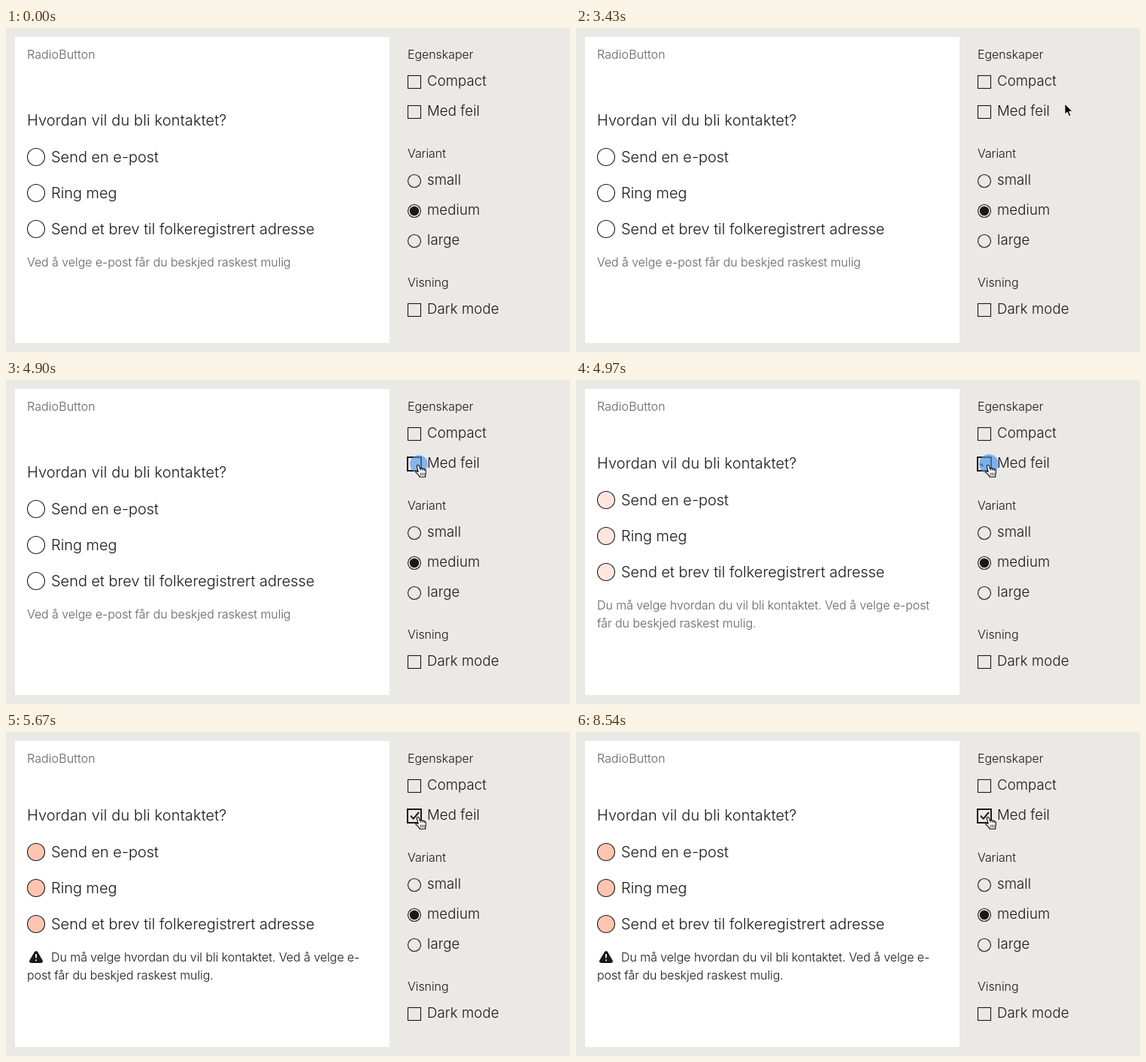
Animation, 750 px wide and 432 px high, one loop 9240 ms. Source, as an HTML page:

```html
<!DOCTYPE html>
<html lang="nb">
<head>
<meta charset="utf-8">
<title>RadioButton</title>
<style>
  html, body { margin: 0; width: 100%; height: 100%; overflow: hidden; background: #ebe9e5; }
  svg { display: block; width: 100vw; height: 100vh; }
  text {
    font-family: Inter, "Open Sans", sans-serif;
    font-weight: 300;
    font-optical-sizing: none;
    letter-spacing: -.004em;
    fill: #1b1917;
  }
  .s { font-size: 16px; }
  .m { font-size: 18.7px; letter-spacing: .002em; }
  .l { font-size: 20px; letter-spacing: -.002em; }
  .title { letter-spacing: .006em; }
  .muted { fill: #636160; }
  .line { fill: none; stroke: #1b1917; stroke-width: 1.1; }
</style>
</head>
<body>
<svg id="stage" viewBox="0 0 750 432">
  <rect width="750" height="432" fill="#ebe9e5"/>
  <rect x="12" y="12" width="498" height="408" fill="#fff"/>
  <text class="s title muted" x="28" y="41">RadioButton</text>
  <g id="form">
    <text class="l title" x="28" y="130">Hvordan vil du bli kontaktet?</text>
    <g id="options"></g>
    <text id="help1" class="s" y="318"></text>
    <text id="help2" class="s" x="28" y="342"></text>
    <g id="warning">
      <path d="M40 306.6L33.6 317.4H46.4Z" fill="#1b1917" stroke="#1b1917" stroke-width="5" stroke-linejoin="round"/>
      <path d="M40 308V313.2M40 315.5V317.3" stroke="#fff" stroke-width="1.8"/>
    </g>
  </g>
  <g id="panel"></g>
  <path id="tick" d="M538 111.8L541.8 115.6L549 107" fill="none" stroke="#1b1917" stroke-width="2" pathLength="1" stroke-dasharray="1 2"/>
  <circle id="press" cx="549" cy="112" fill="#4b94ee"/>
  <g id="cursor" stroke-linejoin="round">
    <path id="arrow" d="M0 0V14.2L3.3 11.2L5.6 16.7L8 15.7L5.7 10.4H10.2Z" fill="#000" stroke="#fff" stroke-width="1"/>
    <g id="hand" stroke="#000" stroke-linecap="round">
      <path d="M-1.2 7.6L-2.6 2.6C-3.1 .6-.4-.4 .3 1.6L1.6 5.4C2.2 4.2 4 4.4 4.3 5.6C5 4.6 6.7 5 6.9 6.2C7.8 5.6 9 6.2 9.2 7.6C9.6 9.6 9.2 11.6 8.8 13L8.6 16.2H1.2C.4 14-2 12.2-3.6 10.6C-5 9-3.4 7.8-1.8 9L-1 9.6Z" fill="#fff" stroke-width="1.1"/>
      <path d="M1.6 5.4L2.1 7.4M4.3 5.6L4.7 7.6M6.9 6.2L7.2 8M2.4 11V14M4.6 11V14M6.8 11V14" fill="none" stroke-width=".8"/>
    </g>
  </g>
</svg>
<script>
  const LOOP = 9240, STEP = 70;
  const ENTER = 3150, ARRIVE = 4060, PRESS = 4690, CLICK = 4920;
  const $ = id => document.getElementById(id);
  const part = (from, to, t) => Math.min(1, Math.max(0, (t - from) / (to - from)));
  const mix = (a, b, p) => a + (b - a) * p;

  const set = (el, attrs) => {
    for (const name in attrs) el.setAttribute(name, attrs[name]);
  };
  const show = (el, on) => set(el, { visibility: on ? "visible" : "hidden" });

  function add(parent, tag, attrs, text = "") {
    const el = document.createElementNS("http://www.w3.org/2000/svg", tag);
    set(el, attrs);
    el.textContent = text;
    return parent.appendChild(el);
  }

  const radios = ["Send en e-post", "Ring meg", "Send et brev til folkeregistrert adresse"].map((label, i) => {
    const y = 172 + 48 * i;
    add($("options"), "text", { class: "l", x: 60, y: y + 7 }, label);
    return add($("options"), "circle", { cx: 40, cy: y, r: 11.5, stroke: "#1b1917", "stroke-width": 1.1 });
  });

  const panel = $("panel");
  const heading = (y, label) => add(panel, "text", { class: "s", x: 534, y }, label);
  const label = (y, text) => add(panel, "text", { class: "m", x: 560, y: y + 5 }, text);

  function checkbox(y, text) {
    label(y, text);
    return add(panel, "rect", { class: "line", x: 534.5, y: y - 8.5, width: 17, height: 17 });
  }
  function radio(y, text, chosen) {
    label(y, text);
    add(panel, "circle", { class: "line", cx: 543, cy: y, r: 8.5 });
    if (chosen) add(panel, "circle", { cx: 543, cy: y, r: 6.2, fill: "#1b1917" });
  }

  heading(41, "Egenskaper");
  checkbox(72, "Compact");
  const errorBox = checkbox(112, "Med feil");
  heading(173, "Variant");
  radio(204, "small");
  radio(244, "medium", true);
  radio(284, "large");
  heading(345, "Visning");
  checkbox(376, "Dark mode");

  const hint = ["Ved å velge e-post får du beskjed raskest mulig", ""];
  const unmarked = ["Du må velge hvordan du vil bli kontaktet. Ved å velge e-post", "får du beskjed raskest mulig."];
  const marked = ["Du må velge hvordan du vil bli kontaktet. Ved å velge e-", "post får du beskjed raskest mulig."];

  function drawHelp(failed, warned) {
    const lines = warned ? marked : failed ? unmarked : hint;
    [$("help1"), $("help2")].forEach((el, i) => {
      if (el.textContent !== lines[i]) el.textContent = lines[i];
      el.classList.toggle("muted", !warned);
    });
    set($("help1"), { x: warned ? 60 : 28 });
    show($("warning"), warned);
  }

  function drawCursor(t) {
    const p = 1 - (1 - part(ENTER, ARRIVE, t)) ** 1.4;
    const x = mix(718, 549, p), y = mix(93, 113, p);
    const visible = t >= ENTER, hover = visible && x < 630;
    show($("arrow"), visible && !hover);
    show($("hand"), hover);
    set($("cursor"), { transform: `translate(${x} ${y})` });

    const size = hover ? 18 : 17;
    set(errorBox, {
      x: 543 - size / 2, y: 112 - size / 2, width: size, height: size,
      style: `stroke-width:${hover ? 2 : 1.1}`
    });
  }

  function draw(time) {
    const t = Math.floor(time % LOOP / STEP) * STEP;
    const failed = t >= CLICK;
    set($("form"), { transform: `translate(0 ${failed ? -12 : 0})` });
    drawHelp(failed, t >= CLICK + 100);
    drawCursor(t);

    const tint = part(CLICK, CLICK + 115, t);
    const fill = `rgb(255 ${mix(255, 197, tint)} ${mix(255, 177, tint)})`;
    radios.forEach(el => set(el, { fill }));

    const tick = part(CLICK, CLICK + 180, t);
    set($("tick"), { "stroke-dashoffset": 1 - tick });
    show($("tick"), tick > 0);

    const grow = part(PRESS, CLICK, t);
    set($("press"), { r: 13 * grow, opacity: .68 * grow * (1 - part(5040, 5390, t)) });
  }

  let start;
  function loop(now) {
    start ??= now;
    draw(now - start);
    requestAnimationFrame(loop);
  }
  draw(0);
  requestAnimationFrame(loop);
</script>
</body>
</html>
```
